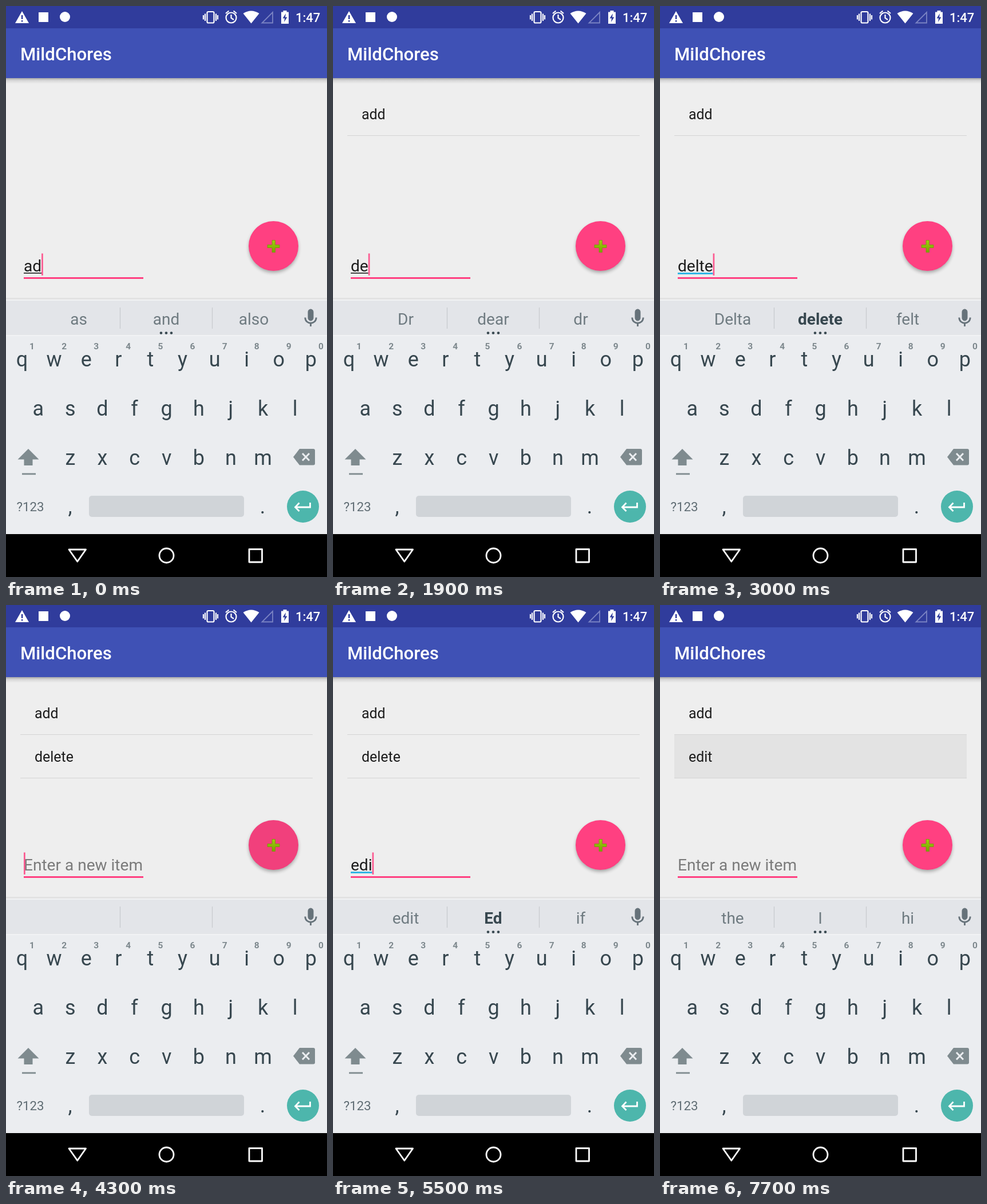
Write an HTML page that moves like this. It is 561 by 998 pixels and loops after 8000 ms.

```html
<!DOCTYPE html>
<html lang="en">
<head>
<meta charset="utf-8">
<title>To-do list</title>
<style>
  html, body { margin: 0; width: 100%; height: 100%; overflow: hidden; background: #eee; }
  svg { display: block; width: 561px; height: 998px; }
  text { font-family: Roboto, sans-serif; white-space: pre; }
  .mid { text-anchor: middle; }
  .key { font-size: 36px; fill: #37474f; }
  .hint { font-size: 15.5px; font-weight: 700; fill: #7d888d; }
  .item { font-size: 24.9px; fill: #1c1c1c; }
  .field { font-size: 28.05px; fill: #1c1c1c; }
  .word { font-size: 28px; fill: #6f7b81; }
  .word.bold { font-weight: 700; fill: #37474f; }
</style>
</head>
<body>
<svg viewBox="0 0 561 998">
  <defs>
    <linearGradient id="drop" x2="0" y2="1">
      <stop offset="0" stop-opacity=".3"/>
      <stop offset=".4" stop-opacity=".1"/>
      <stop offset="1" stop-opacity="0"/>
    </linearGradient>
    <linearGradient id="green" x2="0" y2="1">
      <stop offset="0" stop-color="#a0cf0c"/>
      <stop offset="1" stop-color="#78a300"/>
    </linearGradient>
    <filter id="soft" x="-30%" y="-30%" width="160%" height="160%"><feGaussianBlur stdDeviation="3"/></filter>
    <clipPath id="row"><rect x="25" y="227" width="511" height="75"/></clipPath>
  </defs>

  <rect width="561" height="998" fill="#eee"/>
  <rect y="126" width="561" height="10" fill="url(#drop)"/>
  <rect width="561" height="126" fill="#3f51b5"/>
  <rect width="561" height="39" fill="#303c9c"/>
  <text x="25" y="95" font-size="31.2" font-weight="500" fill="#fff">MildChores</text>

  <!-- status bar -->
  <g fill="#fff">
    <path d="M28 9L40 30H16Z"/>
    <path d="M26.8 16h2.6v7h-2.6zM26.8 25h2.6v2.6h-2.6z" fill="#303c9c"/>
    <rect x="57" y="11" width="17" height="17"/>
    <circle cx="103" cy="19" r="9"/>
    <path d="M428.500 30.500L414.500 13Q428.500 4 442.500 13Z"/>
    <path d="M481 10.500H484.500V8H490.500V10.500H494V31H481Z"/>
    <path d="M489 13L483.500 21.500H487L486 28L491.500 19.500H488Z" fill="#303c9c"/>
    <text x="506" y="28" font-size="22" font-weight="500">1:47</text>
  </g>
  <g fill="none" stroke="#fff" stroke-width="2.2">
    <rect x="351.500" y="10" width="12" height="19.500" rx="2"/>
    <path d="M348 13.500V26M345 16V23.500M367 13.500V26M370 16V23.500"/>
    <circle cx="393.500" cy="20.500" r="9"/>
    <path d="M393.500 15V21L398 24M384 13L389.500 8.500M403 13L397.500 8.500"/>
    <path d="M466 11V29.500H447.500Z" stroke="#7a83c3" stroke-width="1.8"/>
  </g>

  <!-- list -->
  <g clip-path="url(#row)">
    <rect id="held" x="25" y="227" width="511" height="75" fill="#e3e3e3"/>
    <circle id="touch" cx="300" cy="265" fill="#e3e3e3"/>
  </g>
  <g id="list"></g>

  <!-- input -->
  <rect x="31" y="474" width="209" height="3" fill="#ff4081"/>
  <text id="hint" class="field" x="31" y="463.500" style="fill:#7b7b7b">Enter a new item</text>
  <text id="typed" class="field" x="31" y="463.500"></text>
  <rect id="under" x="31"/>
  <rect id="caret" y="432.500" width="2.700" height="38.500" fill="#ff4081" opacity=".85"/>

  <!-- add button -->
  <circle cx="467.500" cy="423" r="43" opacity=".32" filter="url(#soft)"/>
  <circle cx="467.500" cy="419.500" r="43.500" fill="#ff4081"/>
  <circle id="ripple" cx="467.500" cy="419.500" r="43.500" fill="#404040"/>
  <path d="M465 409.500H470.500V417.500H478V422.500H470.500V430.500H465V422.500H457V417.500H465Z" fill="url(#green)" stroke="#7d9410" stroke-width=".9"/>

  <!-- keyboard -->
  <rect y="510" width="561" height="4" opacity=".05"/>
  <rect y="513" width="561" height="410" fill="#ebedf0"/>
  <rect y="514" width="561" height="62" fill="#e3e5e9"/>
  <path d="M0 514H561M0 576H561" stroke="#f5f6f7" stroke-width="1.500"/>
  <rect id="tap" x="200" y="515" width="160" height="60" fill="#d0d4d8"/>
  <path d="M199.500 527V564M360.500 527V564" stroke="#c8cbcf" stroke-width="1.300"/>
  <g id="words"></g>
  <g id="dots" fill="#37474f">
    <circle cx="271" cy="571.500" r="2.300"/><circle cx="280" cy="571.500" r="2.300"/><circle cx="289" cy="571.500" r="2.300"/>
  </g>
  <g fill="none" stroke="#66727a" stroke-width="2.800">
    <rect x="528" y="530" width="9" height="20" rx="4.500" fill="#66727a" stroke-width="1"/>
    <path d="M522.800 544.500C523 557.500 542 557.500 542.200 544.500M532.500 554V560"/>
  </g>
  <rect id="press" width="54" height="82" rx="4" fill="#d4d8db"/>
  <g id="keys"></g>
  <g fill="#7f8b8f">
    <path d="M39 774L57.500 792.500H46.500V803H31.500V792.500H20.500Z"/>
    <rect x="28" y="816.500" width="24" height="2.800"/>
    <path d="M513 774H537Q540 774 540 777V799.500Q540 802.500 537 802.500H513L502 788.300Z"/>
    <path d="M518 782L530 794.500M530 782L518 794.500" stroke="#ebedf0" stroke-width="3"/>
  </g>
  <text class="mid" x="42.500" y="883" font-size="22.300" fill="#606d74">?123</text>
  <rect x="145" y="856" width="271" height="37" rx="5" fill="#d0d4d8"/>
  <circle cx="519" cy="875" r="28" fill="#4db6ac"/>
  <path d="M531.500 868V876H506M512.500 868.500L505.500 876L512.500 883" fill="none" stroke="#fff" stroke-width="2.800"/>
  <g id="popup">
    <rect width="78" height="82" rx="4" y="1.500" opacity=".25" filter="url(#soft)"/>
    <rect width="78" height="82" rx="4" fill="#f7f8f9"/>
    <text id="popLetter" class="key mid" x="39" y="54"></text>
  </g>

  <!-- navigation -->
  <rect y="923" width="561" height="75"/>
  <g fill="none" stroke="#fff" stroke-width="2.800" stroke-linejoin="round">
    <path d="M110 950H139.500L124.800 971Z"/>
    <circle cx="280.500" cy="960.500" r="12.500"/>
    <rect x="425" y="949.500" width="22.500" height="22.500"/>
  </g>
</svg>
<script>
const LOOP = 8000, STEP = 100, PITCH = 56.1;
const $ = id => document.getElementById(id);
const set = (el, attrs) => { for (const k in attrs) el.setAttribute(k, attrs[k]); return el; };
const show = (el, on) => el.style.display = on ? '' : 'none';

function add(parent, tag, attrs, text = '') {
  const el = document.createElementNS('http://www.w3.org/2000/svg', tag);
  el.textContent = text;
  return parent.appendChild(set(el, attrs));
}

// Letter keys, remembered by position for the press feedback
const keyPos = {};
[['qwertyuiop', 28], ['asdfghjkl', 56.3], ['zxcvbnm', 112.4]].forEach(([row, x0], r) => {
  [...row].forEach((ch, i) => {
    const x = x0 + i * PITCH, y = 630 + 86 * r;
    keyPos[ch] = { x, y };
    add($('keys'), 'text', { class: 'key mid', x, y }, ch);
    if (!r) add($('keys'), 'text', { class: 'hint mid', x: x + 17.5, y: 600 }, (i + 1) % 10);
  });
});
add($('keys'), 'text', { class: 'key mid', x: 112, y: 887 }, ',');
add($('keys'), 'text', { class: 'key mid', x: 448.5, y: 887 }, '.');

const words = [127, 280, 433].map(x => add($('words'), 'text', { class: 'word mid', x, y: 557 }));
const rows = [0, 1, 2].map(i => {
  const g = add($('list'), 'g', {});
  add(g, 'text', { class: 'item', x: 50, y: 198 + 76 * i });
  add(g, 'rect', { x: 25, y: 226 + 76 * i, width: 511, height: 1, fill: '#d4d4d4' });
  return g;
});

// time, typed text, suggestions (* = bold), underline, pressed key
const IDLE = 'the I hi';
const typing = [
  [0, 'ad', 'as and also', 'black'],
  [100, 'add', 'as and also', 'black', 'd'],
  [200, 'add', 'ads add added', 'black'],
  [800, '', ''],
  [1100, '', IDLE],
  [1500, '', IDLE, '', 'd'],
  [1600, 'd', 'do d di', 'black'],
  [1700, 'd', 'do d di', 'black', 'e'],
  [1800, 'de', 'do d di', 'black'],
  [1900, 'de', 'Dr dear dr', 'black'],
  [2300, 'de', 'Dr dear dr', 'black', 'l'],
  [2400, 'del', 'Dr dear dr', 'black'],
  [2500, 'del', 'Del del deal', 'black', 't'],
  [2600, 'delt', 'Del del deal', 'black'],
  [2700, 'delt', 'Delta *felt dealt', 'blue'],
  [2800, 'delt', 'Delta *felt dealt', 'blue', 'e'],
  [2900, 'delte', 'Delta *felt dealt', 'blue'],
  [3000, 'delte', 'Delta *delete felt', 'blue'],
  [3600, 'delete ', ''],
  [3700, 'delete ', 'the it my'],
  [4200, '', ''],
  [4500, '', IDLE],
  [4900, '', IDLE, '', 'e'],
  [5000, 'e', 'even e I', 'black'],
  [5100, 'e', 'even e I', 'black', 'd'],
  [5200, 'ed', 'Ed ed end', 'black'],
  [5300, 'ed', 'Ed ed end', 'black', 'i'],
  [5400, 'edi', 'Ed ed end', 'blue'],
  [5500, 'edi', 'edit *Ed if', 'blue'],
  [5600, 'edi', 'edit *Ed if', 'blue', 't'],
  [5700, 'edit', 'edit *Ed if', 'blue', 't'],
  [5800, 'edit', 'Edit edit edited', 'black'],
  [6200, '', ''],
  [6500, '', IDLE]
];
const lists = [[0, ''], [800, 'add'], [4200, 'add delete'], [6200, 'add delete edit'], [7500, 'add edit']];
const addTimes = [800, 4200, 6200];

const latest = (track, t) => track.filter(e => e[0] <= t).pop();

function caretOn(t, text) {
  let reset = 0;
  typing.forEach(([at, s], i) => {
    if (at <= t && i && s !== typing[i - 1][1]) reset = at;
  });
  return Math.floor((t - reset) / 500) % 2 === 0;
}

function drawField(t, text, line) {
  $('typed').textContent = text;
  const w = text ? $('typed').getComputedTextLength() : 0;
  show($('hint'), !text);
  show($('under'), line);
  set($('under'), line === 'blue'
    ? { y: 466, width: w, height: 3, fill: '#33b5e5' }
    : { y: 466, width: w, height: 1.6, fill: '#1c1c1c' });
  set($('caret'), { x: 31 + w });
  show($('caret'), caretOn(t));
}

function drawWords(list) {
  const parts = list.split(' ');
  words.forEach((el, i) => {
    const word = parts[i] || '';
    el.textContent = word.replace('*', '');
    el.classList.toggle('bold', word[0] === '*');
  });
  show($('dots'), list);
}

function drawPress(key) {
  show($('press'), key);
  show($('popup'), key);
  if (!key) return;
  const { x, y } = keyPos[key];
  set($('press'), { x: x - 27, y: y - 54 });
  set($('popup'), { transform: `translate(${x - 39} ${y - 138})` });
  $('popLetter').textContent = key;
}

function drawList(t) {
  const items = latest(lists, t)[1].split(' ');
  rows.forEach((g, i) => {
    show(g, items[i]);
    g.firstChild.textContent = items[i] || '';
  });
  show($('held'), t >= 7500);
  set($('touch'), { r: t >= 7100 && t < 7500 ? Math.min(33, (t - 7000) * 0.11) : 0 });
}

function drawRipple(t) {
  const age = Math.min(...addTimes.map(a => t >= a ? t - a : LOOP));
  $('ripple').style.opacity = 0.07 * Math.max(0, Math.min(1, (500 - age) / 400));
}

function draw(t) {
  const [, text, list, line, key] = latest(typing, t);
  drawField(t, text, line);
  drawWords(list);
  drawPress(key);
  show($('tap'), t === 3500);
  drawList(t);
  drawRipple(t);
}

const start = performance.now();
let last = -1;
function tick() {
  const t = Math.floor((performance.now() - start) % LOOP / STEP) * STEP;
  if (t !== last) draw(last = t);
  requestAnimationFrame(tick);
}
tick();
</script>
</body>
</html>
```
